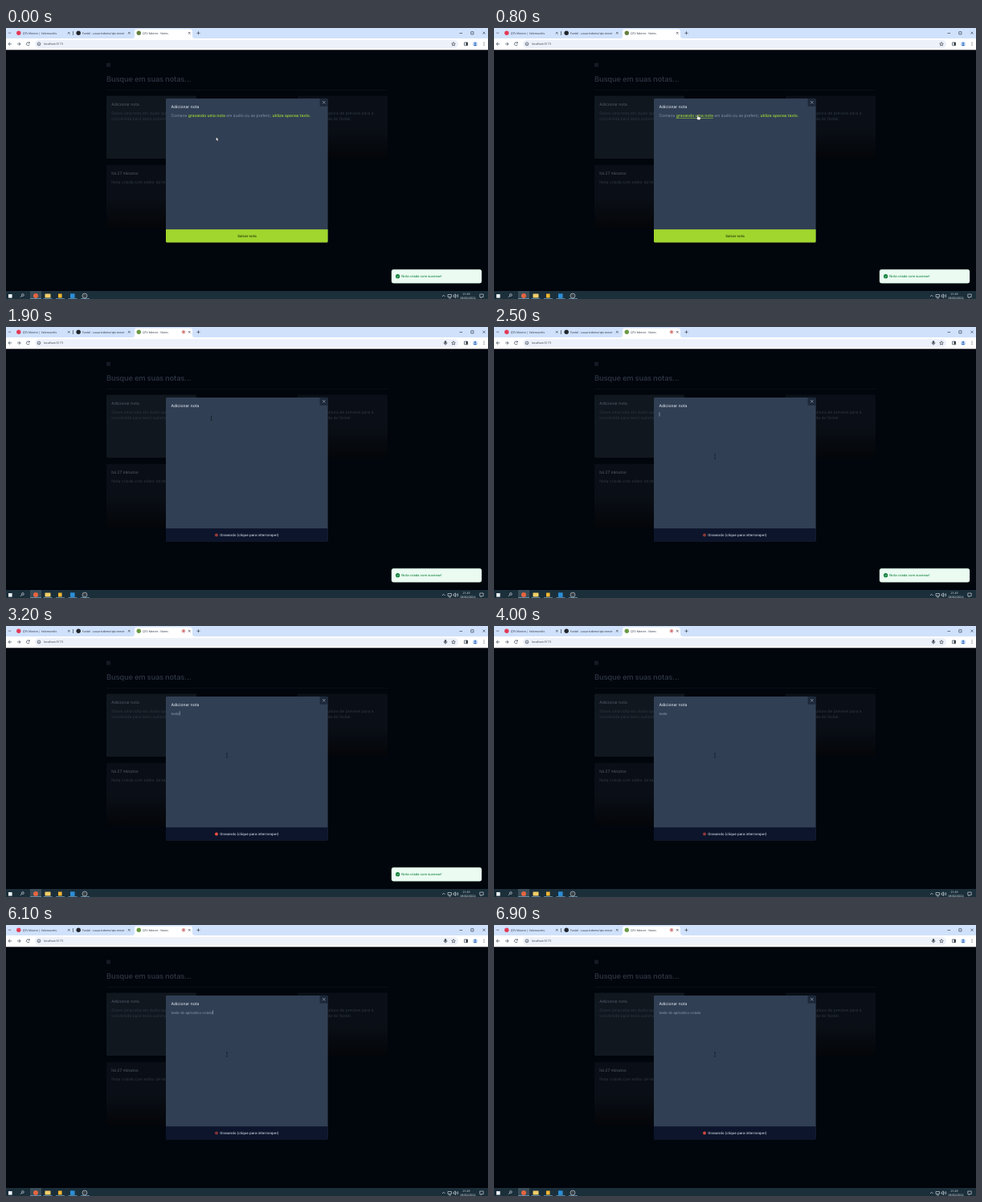
Write an HTML page that moves like this. It is 600 px wide and 338 px high and loops after 7000 ms.

```html
<!DOCTYPE html>
<html lang="pt-BR">
<head>
<meta charset="utf-8">
<title>Notas</title>
<style>
  html, body { margin: 0; width: 100%; height: 100%; overflow: hidden; background: #01050c; }
  svg { display: block; width: 100vw; height: 100vh; }
  text { font-family: Inter, sans-serif; font-size: 5px; text-rendering: geometricPrecision; white-space: pre; }
  .ui text { font-family: "Open Sans", "Noto Sans", sans-serif; font-size: 3.55px; fill: #27313d; }
  .line { fill: none; stroke: #3c4653; stroke-width: .7; }
  .tray .line { stroke: #e4eaee; stroke-width: .6; }
  .ui .tray text { fill: #edf1f4; }
  .title { font-weight: 500; }
  .small { font-size: 4.375px; }
  .bold { font-weight: 500; text-anchor: middle; }
  .lime { fill: #a3dc35; font-weight: 500; }
</style>
</head>
<body>
<svg viewBox="0 0 600 338" preserveAspectRatio="none">
  <defs>
    <linearGradient id="fade" x2="0" y2="1">
      <stop offset=".5" stop-color="#000" stop-opacity="0"/>
      <stop offset="1" stop-color="#000" stop-opacity=".65"/>
    </linearGradient>
    <clipPath id="round"><rect x="199" y="87.7" width="201.6" height="179.9" rx="1.6"/></clipPath>
  </defs>

  <!-- Page behind the dialog -->
  <rect width="600" height="338" fill="#01050c"/>
  <rect x="125" y="43.5" width="5" height="5" fill="#151b25"/>
  <text x="125" y="66.7" fill="#29313d" style="font-size:9.375px;font-weight:600;letter-spacing:-.23px">Busque em suas notas...</text>
  <rect x="125" y="77" width="350" height=".6" fill="#10171f"/>
  <rect x="125" y="84.4" width="112" height="78.6" rx="1.6" fill="#10171f"/>
  <g fill="#0a0f17">
    <rect x="363" y="84.4" width="112" height="78.6" rx="1.6"/>
    <rect x="125" y="170.8" width="112" height="78.6" rx="1.6"/>
  </g>
  <g fill="url(#fade)">
    <rect x="363" y="84.4" width="112" height="78.6" rx="1.6"/>
    <rect x="125" y="170.8" width="112" height="78.6" rx="1.6"/>
  </g>
  <g fill="#4b535e" class="title">
    <text x="131.2" y="96.5">Adicionar nota</text>
    <text x="131.2" y="182.8">há 27 minutos</text>
  </g>
  <g fill="#303843">
    <text x="131.2" y="107.8">Grave uma nota em áudio que será</text>
    <text x="131.2" y="115.3">convertida para texto automaticamente.</text>
    <text x="131.2" y="194.2">Nota criada com editor de texto</text>
    <g text-anchor="end">
      <text x="457.5" y="107.8">captura de preview para a</text>
      <text x="430" y="115.3">de do fardel.</text>
    </g>
  </g>

  <!-- Browser -->
  <g class="ui">
    <rect width="600" height="14" fill="#d0e1fb"/>
    <rect y="13" width="600" height="14.3" fill="#fff"/>
    <path d="M157 13q3 0 3-3V4.500q0-3 3-3h66q3 0 3 3V10q0 3 3 3z" fill="#fff"/>
    <rect x="36" y="15" width="527" height="10" rx="5" fill="#edf1f9"/>
    <path class="line" d="M3 5.500l1.500 1.500 1.500-1.500M83.500 4v5"/>
    <circle cx="15.800" cy="6.300" r="2.700" fill="#e23b56"/>
    <circle cx="90.200" cy="6.300" r="2.700" fill="#20252b"/>
    <circle id="favicon" cx="165.300" cy="6.300" r="2.700"/>
    <text x="20.700" y="7.700">QTV Mestre | Velomundis</text>
    <text x="95" y="7.700">Fardel - usuariodemo/qtv-mestr</text>
    <text x="170" y="7.700">QTV Mestre - Notes</text>
    <path class="line" d="M77 5l2.600 2.600m0-2.600l-2.600 2.600M152 5l2.600 2.600m0-2.600l-2.600 2.600M227 5l2.600 2.600m0-2.600l-2.600 2.600M237.500 6.300h4m-2-2v4M564.500 6.500h3.500M578.800 4.700h3.200v3.200h-3.200zM593.500 4.700l3 3m0-3l-3 3"/>
    <path class="line" d="M7 19.900H3m2-2l-2 2 2 2M14 19.900h4m-2-2l2 2-2 2M29 18.600a2 2 0 1 0 .3 2M29.300 17.300v1.700h-1.700"/>
    <g class="line"><circle cx="41" cy="19.900" r="1.900"/><path d="M41 19.500v1.400"/></g>
    <text x="47" y="21.200">localhost:5173</text>
    <path class="line" d="M557 17.700l.7 1.500 1.600.2-1.200 1.100.3 1.600-1.400-.8-1.400.8.3-1.600-1.200-1.100 1.600-.2zM570.500 18h4v3.800h-4z"/>
    <path d="M572.600 18h2v3.800h-2z" fill="#27313d"/>
    <circle cx="584" cy="19.900" r="3" fill="#b9d2f4"/>
    <path d="M582 22q2-3 4 0zM583 18.900a1 1 0 1 0 2 0a1 1 0 1 0-2 0" fill="#2c62b4"/>
    <path d="M595 18v4" stroke="#3c4653" stroke-width="1" stroke-linecap="round" stroke-dasharray="0 1.800"/>
    <g id="tabMic">
      <circle class="line" cx="221" cy="6.300" r="1.900" style="stroke:#c66a68"/>
      <circle cx="221" cy="6.300" r="1" fill="#c43c3a"/>
    </g>
    <g id="barMic" class="line">
      <rect x="546.100" y="17.500" width="1.800" height="3" rx=".9" fill="#3c4653"/>
      <path d="M545 19.500q0 2 2 2t2-2M547 21.500v1"/>
    </g>

    <!-- Taskbar -->
    <g class="tray">
      <rect y="328" width="600" height="10" fill="#1b2f3b"/>
      <rect x="30" y="328" width="14" height="10" fill="#3a4d58"/>
      <path d="M30 337.600h14M46.500 337.600h11M62 337.600h11M77.500 337.600h11M93 337.600h11" stroke="#7fb2d6" stroke-width=".7"/>
      <rect x="3" y="332" width="4.600" height="4.600" fill="#eef4f8"/>
      <path class="line" d="M22.300 333a1.400 1.400 0 1 0-2.800 0a1.400 1.400 0 1 0 2.800 0M19.800 334l-2 2"/>
      <circle cx="37" cy="334" r="3" fill="#e5653f"/>
      <rect x="48.500" y="331.500" width="7" height="5" rx=".5" fill="#f3ce68"/>
      <rect x="65" y="331.500" width="4.600" height="5" fill="#f2b632"/>
      <rect x="80" y="331.300" width="5.600" height="5.600" fill="#2b8ed6"/>
      <circle cx="98" cy="334" r="3" fill="#39424a" stroke="#d5dadd" stroke-width=".6"/>
      <path class="line" d="M543 335l1.800-1.800 1.800 1.800M550 332.500h4.500v3H550zM551 337h3M557 333.200h1l1.500-1.300v4.600l-1.500-1.300h-1zM560.700 333q1 1.200 0 2.400M562 332q1.800 2.200 0 4.400M589.800 332h4.400v3.600h-2l-1 1.200v-1.200h-1.400z"/>
      <g text-anchor="middle">
        <text x="573" y="332.600">21:43</text>
        <text x="575" y="338.200">08/02/2024</text>
      </g>
    </g>
  </g>

  <!-- Dialog -->
  <g clip-path="url(#round)">
    <rect x="199" y="87.700" width="202" height="180" fill="#313f54"/>
    <rect x="390.600" y="87.700" width="10" height="10" fill="#1d283a"/>
    <path d="M394 91l3.400 3.400m0-3.400l-3.400 3.400" stroke="#a7b3c3" stroke-width=".65"/>
    <text class="title" x="205.500" y="99.700" fill="#d3dae4">Adicionar nota</text>
    <g id="intro">
      <text x="205.500" y="111" fill="#8594a9">Comece <tspan id="link" class="lime">gravando uma nota</tspan> em áudio ou se preferir, <tspan class="lime">utilize apenas texto.</tspan></text>
      <rect x="199" y="251.200" width="202" height="17" fill="#a0d62d"/>
      <text class="small bold" x="300" y="261" fill="#1e3208">Salvar nota</text>
    </g>
    <g id="recording">
      <text id="note" class="small" x="205.500" y="110.700" fill="#8d9bb0"></text>
      <rect id="caret" y="106.200" width=".6" height="5.400" fill="#a9b5c5"/>
      <rect x="199" y="251.200" width="202" height="17" fill="#0c152b"/>
      <circle id="dot" cx="262" cy="259.500" r="2" fill="#f04f43"/>
      <text class="small bold" x="303" y="261" fill="#d0d8e3">Gravando (clique para interromper)</text>
    </g>
  </g>

  <g id="toast">
    <rect x="480" y="301.200" width="112" height="17" rx="2.500" fill="#ebfbf2" stroke="#c3f3d8" stroke-width=".4"/>
    <circle cx="487.600" cy="309.700" r="2.600" fill="#11803a"/>
    <path d="M486.400 309.700l.9.900 1.600-1.700" fill="none" stroke="#ebfbf2" stroke-width=".6"/>
    <text x="492.300" y="311.100" fill="#168540" style="font-size:4.060px;font-weight:500">Nota criada com sucesso!</text>
  </g>

  <!-- Pointers, hot spot at 0,0 -->
  <g id="pointer">
    <path id="arrow" d="M0 0v4.800l1.100-1 .8 1.800.8-.4-.8-1.700h1.500z" fill="#fff" stroke="#111" stroke-width=".35"/>
    <path id="hand" d="M-.5 0q.6-.6 1.100 0v2.100l2.600.7q.6.300.5 1l-.5 2.200H0L-1.700 3.800q.3-.8 1.200 0z" fill="#fff" stroke="#111" stroke-width=".35"/>
    <path id="beam" d="M-1-2.800q1 0 1 .7 0-.7 1-.7M0-2.100v4.200M-1 2.800q1 0 1-.7 0 .7 1 .7" fill="none" stroke="#10161f" stroke-width=".6"/>
  </g>
</svg>
<script>
const LOOP = 7000, STEP = 100, RECORD = 1300;
const el = Object.fromEntries([...document.querySelectorAll('[id]')].map(e => [e.id, e]));
const speech = [
  [RECORD, ''],
  [3100, 'teste'],
  [4300, 'teste do'],
  [4600, 'teste do aplicativo'],
  [5950, 'teste do aplicativo criado'],
];

const show = (node, on) => node.setAttribute('visibility', on ? 'inherit' : 'hidden');
const progress = (t, from, to) => Math.min(1, Math.max(0, (t - from) / (to - from)));
const smooth = p => p * p * (3 - 2 * p);
const mix = (a, b, p) => a + (b - a) * p;

function movePointer(t, recording) {
  const p = smooth(recording ? progress(t, 1800, 2400) : progress(t, 0, 500));
  const [x, y] = recording
    ? [mix(254, 275, p), mix(110, 161.5, p)]
    : [mix(261.5, 253.5, p), mix(136, 108.5, p)];
  const hover = !recording && y < 112;
  el.pointer.setAttribute('transform', `translate(${x} ${y})`);
  show(el.arrow, !recording && !hover);
  show(el.hand, hover);
  show(el.beam, recording);
  el.link.style.textDecoration = hover ? 'underline' : 'none';
}

function render(t) {
  const recording = t >= RECORD;
  show(el.intro, !recording);
  show(el.recording, recording);
  show(el.barMic, recording);
  show(el.tabMic, t > RECORD);
  el.favicon.setAttribute('fill', t > RECORD ? '#6c9a45' : '#64813f');
  movePointer(t, recording);

  // Each spoken phrase restarts the caret blink
  const [since, words] = speech.findLast(([at]) => at <= t) || speech[0];
  if (el.note.textContent !== words) el.note.textContent = words;
  const width = words ? el.note.getComputedTextLength() : 0;
  el.caret.setAttribute('x', 205.5 + width + .2);
  show(el.caret, recording && (words ? (t - since) % 1000 < 500 : (t - 1250) % 1000 < 500));

  el.dot.setAttribute('opacity', .75 + .25 * Math.cos((t - 1250) * Math.PI / 1000));

  const leave = smooth(progress(t, 3300, 3600));
  el.toast.setAttribute('opacity', 1 - leave);
  el.toast.setAttribute('transform', `translate(0 ${17 * leave})`);
}

function frame() {
  const t = performance.now() % LOOP;
  render(Math.floor(t / STEP) * STEP);
  requestAnimationFrame(frame);
}
frame();
</script>
</body>
</html>
```
